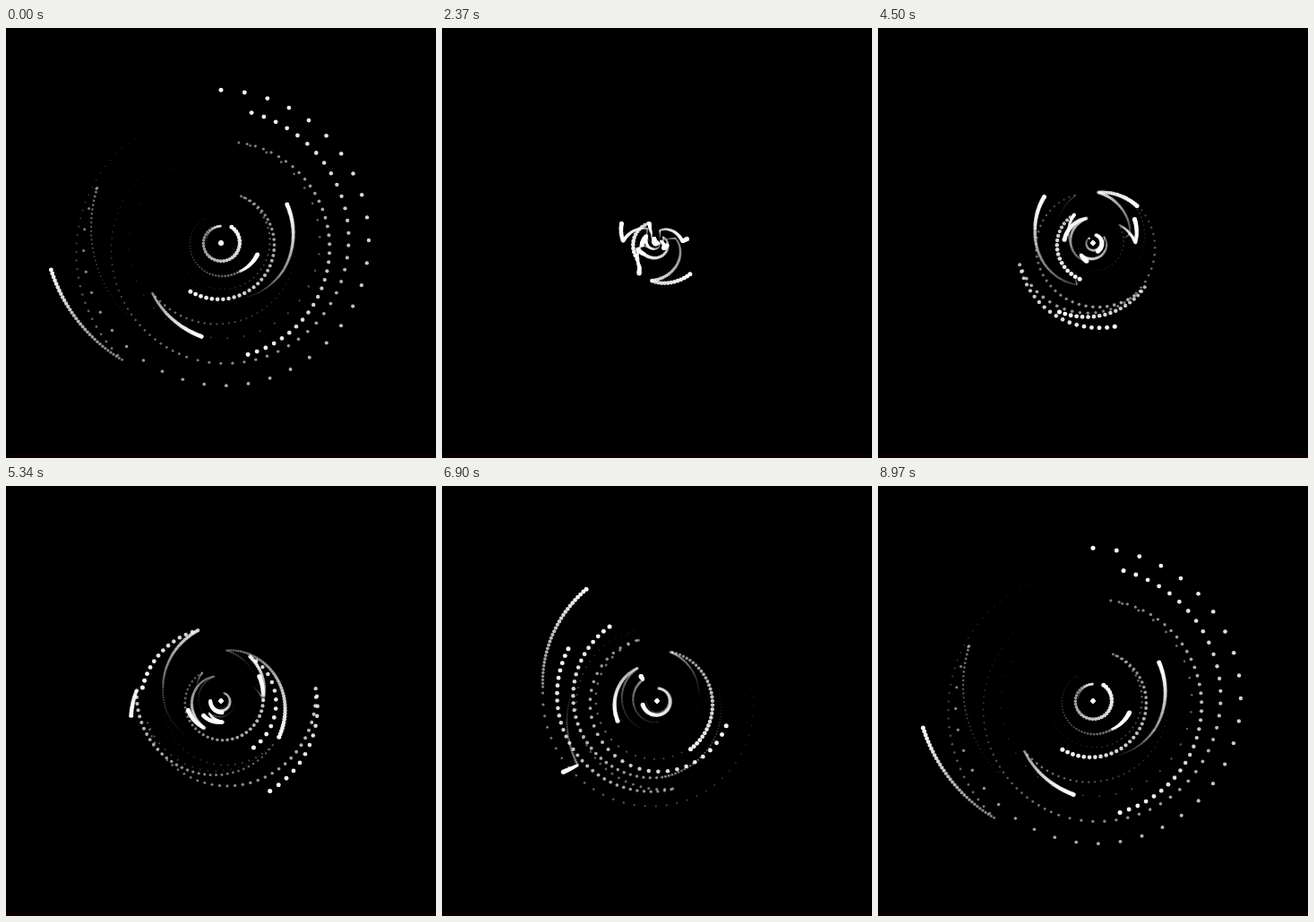
Write an HTML page with a canvas that moves like this. It is 480 px wide and 480 px high and loops after 9000 ms.

```html
<!DOCTYPE html>
<html lang="en">
<head>
<meta charset="utf-8">
<title>Orbit trails</title>
<style>
html, body { margin: 0; width: 100%; height: 100%; overflow: hidden; background: #000; }
canvas { display: block; }
</style>
</head>
<body>
<canvas id="stage" width="480" height="480"></canvas>
<script>
const ctx = document.getElementById('stage').getContext('2d');
const FRAMES = 300, STEP = 30, LIFE = 85, DOT = 2.5, REACH = 192, CENTER = 240;

// Way points of each orbit in degrees, clockwise from the top.
const orbits = [
  [0, 0, 0, 0, 0, 0, 0, 0, 0, 0],
  [120, 200, 325, 320, 20, 271, 5, 276, 360, 33.7],
  [240, 60, 130, 60, 225, 176, 327, 327, 147, 107.6],
  [60, 200, 304, 193, 345, 212, 330, 236, 22, 212.2],
  [150, 45, 229, 287, 327, 81, 15, 156, 114, 59.8],
  [280, 330, 339, 55.5, 89.5, 33, 346, 90, 234, 191.8],
  [40, 12, 86, 76, 6, 91, 177, 340, 9, 166.4],
  [200, 265, 216, 201, 283, 342, 168, 311.5, 198, 13.2],
  [250, 327, 273, 341, 130, 277.5, 231, 233, 295.5, 0],
  [60, 76, 189.5, 41, 254, 82, 276, 332, 220, 261]
];
const legs = orbits[0].length - 1;

function position(orbit, frame) {
  const progress = frame / (FRAMES - 1);
  const leg = Math.min(Math.floor(progress * legs), legs - 1);
  const [from, to] = orbits[orbit].slice(leg, leg + 2);
  const angle = (from + (to - from) * (progress * legs - leg)) * Math.PI / 180;
  const radius = REACH * progress * orbit / (orbits.length - 1);
  return [CENTER + radius * Math.sin(angle), CENTER - radius * Math.cos(angle)];
}

function draw(frame) {
  ctx.globalAlpha = 1;
  ctx.fillStyle = '#000';
  ctx.fillRect(0, 0, 480, 480);
  ctx.fillStyle = '#0a0004';
  ctx.fillRect(0, 476, 480, 4);
  ctx.fillStyle = '#fff';
  for (let age = LIFE - 1; age >= 0; age--) {
    const life = 1 - age / LIFE;
    ctx.globalAlpha = life ** 1.5;
    for (let i = 0; i < orbits.length; i++) {
      ctx.beginPath();
      ctx.arc(...position(i, (frame - age + FRAMES) % FRAMES), DOT * life, 0, 2 * Math.PI);
      ctx.fill();
    }
  }
}

const start = performance.now();
function tick() {
  draw(Math.floor((performance.now() - start) / STEP) % FRAMES);
  requestAnimationFrame(tick);
}
tick();
</script>
</body>
</html>
```
